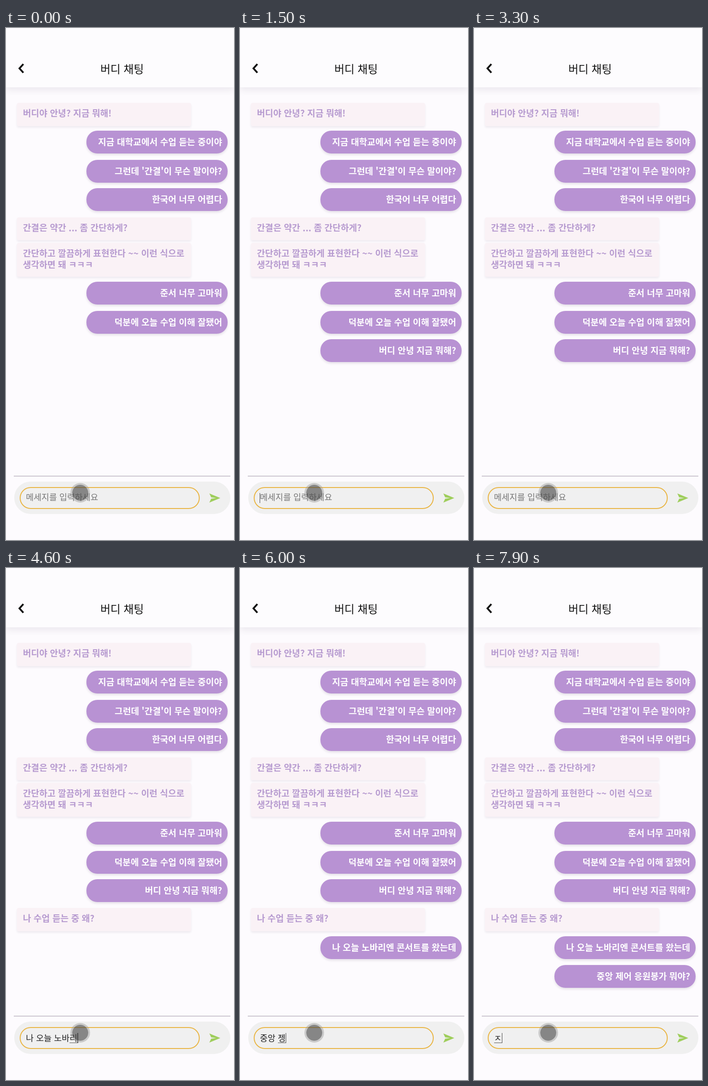
Animation, 499 px wide and 1122 px high, one loop 8000 ms. Source, as an HTML page:

```html
<!DOCTYPE html>
<html lang="ko">
<head>
<meta charset="utf-8">
<style>
  html, body { margin: 0; width: 100%; height: 100%; overflow: hidden; background: #fdfbfe; }
  body { position: relative; font-family: "Noto Sans CJK KR", "Noto Sans CJK", "Noto Sans CJK JP", sans-serif; }
  #stage { position: absolute; left: 0; top: 0; width: 499px; height: 1122px; overflow: hidden; background: #fdfbfe; }
  #stage > * { position: absolute; box-sizing: border-box; white-space: pre; }
  header { left: 0; top: 0; width: 499px; height: 130px; background: #fdfcfe; box-shadow: 0 6px 14px rgba(60, 40, 80, .09); }
  h1 { margin: 0; left: 0; top: 70px; width: 508px; text-align: center; font-size: 24px; line-height: 38px; font-weight: 500; color: #111; }
  .msg { font-size: 19.4px; font-weight: 700; line-height: 24.5px; }
  .out { left: 176px; width: 309px; height: 50px; padding: 12px 12px 0; border-radius: 24px; text-align: right;
         color: #fff; background: #b892d3; box-shadow: 0 3px 5px rgba(60, 40, 80, .13); }
  .in { left: 24px; width: 381px; padding: 10px 13px 0; border-radius: 4px;
        color: #b79bd0; background: #faf2f6; box-shadow: 0 3px 4px rgba(60, 40, 80, .08); }
  #rule { left: 17px; top: 981px; width: 474px; height: 2px; background: #cbc5cf; }
  #bar { left: 18px; top: 994px; width: 473px; height: 71px; border-radius: 36px; background: #f0f0f0; }
  #field { left: 30px; top: 1006px; width: 394px; height: 48px; padding-left: 11.5px; border: 2.5px solid #e9b544;
           border-radius: 24px; font-size: 18.5px; line-height: 42px; color: #222; }
  #field.empty { color: #777; line-height: 39px; }
  #field u { text-decoration: none; box-shadow: 0 1px #555; display: inline-block; line-height: 22px; }
  #caret { top: 1019px; width: 1.5px; height: 22px; background: #444; }
  #touch { left: 141px; top: 997px; width: 43px; height: 43px; border-radius: 50%;
           background: rgba(70, 70, 70, .62); border: 4px solid rgba(150, 150, 150, .42); background-clip: padding-box; }
  svg { left: 0; top: 0; }
</style>
</head>
<body>
<div id="stage">
  <header></header>
  <h1>버디 채팅</h1>
  <div id="rule"></div>
  <div id="bar"></div>
  <div id="field"></div>
  <div id="caret"></div>
  <svg width="499" height="1122">
    <path d="M38 79 L29.5 88.5 L38 98" fill="none" stroke="#111" stroke-width="4"/>
    <path d="M445 1020 L469 1030 L445 1040 L449 1031.5 L460 1030 L449 1028.5 Z" fill="#9fce5c"/>
  </svg>
  <div id="touch"></div>
</div>
<script>
const LOOP = 8000, STEP = 100;
const stage = document.getElementById('stage');
const field = document.getElementById('field');
const caret = document.getElementById('caret');

// side, top, height, time of arrival, text
const messages = [
  ['in', 164, 51, 0, '버디야 안녕? 지금 뭐해!'],
  ['out', 225, 50, 0, '지금 대학교에서 수업 듣는 중이야'],
  ['out', 288.5, 50, 0, "그런데 '간결'이 무슨 말이야?"],
  ['out', 351, 50, 0, '한국어 너무 어렵다'],
  ['in', 415, 50, 0, '간결은 약간 ... 좀 간단하게?'],
  ['in', 471, 74, 0, '간단하고 깔끔하게 표현한다 ~~ 이런 식으로\n생각하면 돼 ㅋㅋㅋ'],
  ['out', 556, 50, 0, '준서 너무 고마워'],
  ['out', 619.5, 50, 0, '덕분에 오늘 수업 이해 잘됐어'],
  ['out', 682, 50, 1400, '버디 안녕 지금 뭐해?'],
  ['in', 745, 51, 3700, '나 수업 듣는 중 왜?'],
  ['out', 807, 50, 5500, '나 오늘 노바리엔 콘서트를 왔는데'],
  ['out', 870, 50, 7800, '중앙 제어 응원봉가 뭐야?'],
].map(([side, top, height, at, text]) => {
  const el = document.createElement('div');
  el.className = 'msg ' + side;
  el.style.top = top + 'px';
  el.style.height = height + 'px';
  el.textContent = text;
  stage.insertBefore(el, document.getElementById('rule'));
  return { el, at };
});

const LEADS = 'ㄱㄲㄴㄷㄸㄹㅁㅂㅃㅅㅆㅇㅈㅉㅊㅋㅌㅍㅎ';
const TAILS = ' ㄱㄲㄳㄴㄵㄶㄷㄹㄺㄻㄼㄽㄾㄿㅀㅁㅂㅄㅅㅆㅇㅈㅊㅋㅌㅍㅎ';
const isSyllable = c => c >= '가' && c <= '힣';
const syllable = (lead, vowel, tail) => String.fromCharCode(0xac00 + (lead * 21 + vowel) * 28 + tail);
const baseVowel = v => v > 8 && v < 12 ? 8 : v > 13 && v < 17 ? 13 : v === 19 ? 18 : v;

// Every state of the field while a two-set Korean keyboard composes the text
function keystrokes(text) {
  const states = [];
  let done = '';
  for (const c of text) {
    if (isSyllable(c)) {
      const code = c.charCodeAt(0) - 0xac00;
      const lead = Math.floor(code / 588), vowel = Math.floor(code / 28) % 21, tail = code % 28;
      const last = done.slice(-1);
      const lastCode = last.charCodeAt(0) - 0xac00;
      const carried = TAILS.indexOf(LEADS[lead]);
      const attaches = isSyllable(last) && lastCode % 28 === 0 && carried > 0;
      states.push(attaches ? done.slice(0, -1) + String.fromCharCode(0xac00 + lastCode + carried) : done + LEADS[lead]);
      if (baseVowel(vowel) !== vowel) states.push(done + syllable(lead, baseVowel(vowel), 0));
      states.push(done + syllable(lead, vowel, 0));
      if (tail) states.push(done + c);
    } else states.push(done + c);
    done += c;
  }
  return states;
}

// Each draft is typed evenly between its [time, text so far] marks
const drafts = [
  { from: 100, to: 1400, marks: [[100, 'ㅂ'], [1300, '버디 안녕 지금 뭐해?']] },
  { from: 3800, to: 5500, marks: [[3800, 'ㄴ'], [4600, '나 오늘 노바리'], [5400, '나 오늘 노바리엔 콘서트를 왔는데']] },
  { from: 5600, to: 7800, marks: [[5600, 'ㅈ'], [6000, '중앙 젱'], [7300, '중앙 제어 응원봉가 ㅁ'],
                                  [7400, '중앙 제어 응원봉가 ㅁ'], [7700, '중앙 제어 응원봉가 뭐야?']] },
  { from: 7900, to: 8000, marks: [[7900, 'ㅈ']] },
];
for (const d of drafts) {
  d.states = keystrokes(d.marks[d.marks.length - 1][1]);
  if (!d.states.length) d.states = [d.marks[0][1]];
  d.points = d.marks.map(([time, text]) => [time, Math.max(0, d.states.indexOf(text))]);
}

function typedText(t) {
  const d = drafts.find(d => t >= d.from && t < d.to);
  if (!d) return '';
  const next = d.points.findIndex(p => p[0] > t);
  if (next < 0) return d.states[d.points[d.points.length - 1][1]];
  const [t0, i0] = d.points[next - 1], [t1, i1] = d.points[next];
  return d.states[Math.floor(i0 + (i1 - i0) * (t - t0) / (t1 - t0))];
}

function showField(text) {
  field.className = text ? '' : 'empty';
  if (!text) { field.textContent = '메세지를 입력하세요'; return; }
  const last = text.slice(-1);
  const composing = isSyllable(last) || /[ㄱ-ㅎ]/.test(last);
  field.textContent = composing ? text.slice(0, -1) : text;
  if (composing) field.appendChild(document.createElement('u')).textContent = last;
}

function caretX(text) {
  if (!text) return 42.5;
  const range = document.createRange();
  range.selectNodeContents(field);
  return range.getBoundingClientRect().right - stage.getBoundingClientRect().left;
}

let shown = -1;
function draw(now) {
  const t = Math.floor(now % LOOP / STEP) * STEP;
  if (t !== shown) {
    shown = t;
    for (const m of messages) m.el.style.visibility = t >= m.at ? 'visible' : 'hidden';
    const text = typedText(t);
    showField(text);
    const blinkOn = t >= 1400 && Math.floor((t - 1400) / 250) % 2 === 0;
    caret.style.visibility = text || blinkOn ? 'visible' : 'hidden';
    caret.style.left = caretX(text) + 'px';
  }
}

const start = performance.now();
function tick() {
  draw(performance.now() - start);
  requestAnimationFrame(tick);
}
tick();
</script>
</body>
</html>
```
